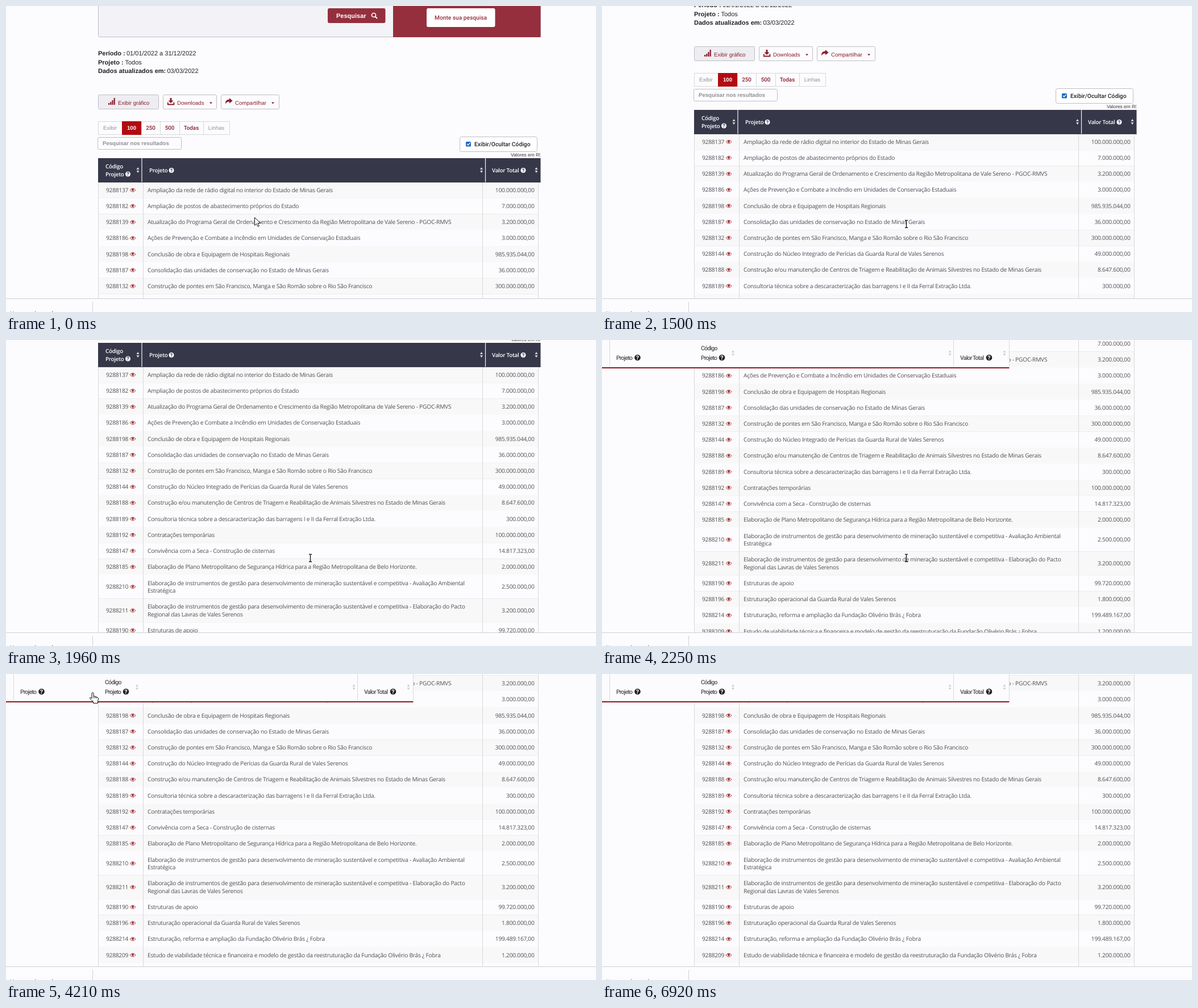
These frames come from a looping animation (1038x539 px, 7080 ms). An HTML page:

```html
<!DOCTYPE html>
<html lang="pt-BR">
<head>
<meta charset="utf-8">
<title>Consulta de projetos</title>
<style>
  html, body { margin: 0; width: 100%; height: 100%; overflow: hidden; background: #fcfcfe; }
  svg { display: block; width: 1038px; height: 539px; }
  text { text-rendering: geometricPrecision; white-space: pre; }
  .row { font: 10.2px "Open Sans", sans-serif; letter-spacing: -.24px; fill: #505056; }
  .head { font: 600 9.8px "Open Sans", sans-serif; letter-spacing: -.25px; fill: #fff; }
  .arial { font: 11px "Liberation Sans", Arial, sans-serif; fill: #222; }
  .small { font: 9.6px "Liberation Sans", Arial, sans-serif; }
  .mid { font: 500 9.8px Roboto, sans-serif; }
  .narrow { font: 500 10.5px Roboto, sans-serif; letter-spacing: -.8px; fill: #505054; }
  .bold { font-weight: 700; }
</style>
</head>
<body>
<svg viewBox="0 0 1038 539">
  <g id="page"></g>
  <g id="sticky"></g>
  <g id="footer"></g>
  <g id="arrow"><path d="M.5.5V14.5L3.8 11.4L6 16.5L8.3 15.5L6.1 10.5H10.5Z" fill="#fff" stroke="#111"/></g>
  <g id="beam"><path d="M-2.5-6.5H-1L0-5.8L1-6.5H2.5M0-6V6M-2.5 6.5H-1L0 5.8L1 6.5H2.5" fill="none" stroke="#111" stroke-width="1.3"/></g>
  <g id="hand"><path d="M-.5 1.5Q1 -.7 2.5 1.5V7L5 7.3V8L7.6 8.2V9L9.8 9.3Q11.2 9.8 11 12L10 16V19.5H2V17L-3.8 11.2Q-4.5 9.3 -2.6 9.4L-.5 11Z" fill="#fff" stroke="#111" stroke-linejoin="round"/><path d="M2.5 7V11M5 8V11M7.6 9V11.5" stroke="#111" stroke-width=".8"/></g>
</svg>
<script>
const LOOP = 7080, FRAME = 1000 / 24;
const PAPER = '#fcfcfe', WINE = '#952f3d', DEEP = '#8b1c2b', NAVY = '#363849', EDGE = '#bdbdc6', RULE = '#d8d8dc';
const get = id => document.getElementById(id);

const text = (x, y, str, cls, extra = '') => `<text x="${x}" y="${y}" class="${cls}" ${extra}>${str}</text>`;
const box = (x, y, w, h, fill, stroke = 'none', r = 0) =>
  `<rect x="${x}" y="${y}" width="${w}" height="${h}" rx="${r}" fill="${fill}" stroke="${stroke}"/>`;
const path = (d, fill, stroke = 'none', w = 1) => `<path d="${d}" fill="${fill}" stroke="${stroke}" stroke-width="${w}"/>`;
const ink = color => `style="fill:${color}"`;

const help = (x, y, r, disc, mark) => `<circle cx="${x}" cy="${y}" r="${r}" fill="${disc}"/>` +
  text(x, y + r * .72, '?', '', `text-anchor="middle" style="font:700 ${r * 2}px Roboto,sans-serif;fill:${mark}"`);
const sorter = (x, y, color) => path(`M${x - 2.5} ${y - 1}l2.5-4l2.5 4zM${x - 2.5} ${y + 1}l2.5 4l2.5-4z`, color);
const caret = (x, y) => path(`M${x - 2.5} ${y - 1}h5l-2.5 3z`, DEEP);
const eye = (x, y) => path(`M${x - 5} ${y}Q${x} ${y - 6} ${x + 5} ${y}Q${x} ${y + 6} ${x - 5} ${y}Z`, PAPER, '#a5393d') +
  `<circle cx="${x}" cy="${y - .4}" r="2.1" fill="#a5393d"/>`;

const rows = `9288137|Ampliação da rede de rádio digital no interior do Estado de Minas Gerais|100.000.000,00
9288182|Ampliação de postos de abastecimento próprios do Estado|7.000.000,00
9288139|Atualização do Programa Geral de Ordenamento e Crescimento da Região Metropolitana de Vale Sereno - PGOC-RMVS|3.200.000,00
9288186|Ações de Prevenção e Combate a Incêndio em Unidades de Conservação Estaduais|3.000.000,00
9288198|Conclusão de obra e Equipagem de Hospitais Regionais|985.935.044,00
9288187|Consolidação das unidades de conservação no Estado de Minas Gerais|36.000.000,00
9288132|Construção de pontes em São Francisco, Manga e São Romão sobre o Rio São Francisco|300.000.000,00
9288144|Construção do Núcleo Integrado de Perícias da Guarda Rural de Vales Serenos|49.000.000,00
9288188|Construção e/ou manutenção de Centros de Triagem e Reabilitação de Animais Silvestres no Estado de Minas Gerais|8.647.600,00
9288189|Consultoria técnica sobre a descaracterização das barragens I e II da Ferral Extração Ltda.|300.000,00
9288192|Contratações temporárias|100.000.000,00
9288147|Convivência com a Seca - Construção de cisternas|14.817.323,00
9288185|Elaboração de Plano Metropolitano de Segurança Hídrica para a Região Metropolitana de Belo Horizonte.|2.000.000,00
9288210|Elaboração de instrumentos de gestão para desenvolvimento de mineração sustentável e competitiva - Avaliação Ambiental~Estratégica|2.500.000,00
9288211|Elaboração de instrumentos de gestão para desenvolvimento de mineração sustentável e competitiva - Elaboração do Pacto~Regional das Lavras de Vales Serenos|3.200.000,00
9288190|Estruturas de apoio|99.720.000,00
9288196|Estruturação operacional da Guarda Rural de Vales Serenos|1.800.000,00
9288214|Estruturação, reforma e ampliação da Fundação Olivério Brás ¿ Fobra|199.489.167,00
9288209|Estudo de viabilidade técnica e financeira e modelo de gestão da reestruturação da Fundação Olivério Brás ¿ Fobra|1.200.000,00
||`.split('\n').map(line => line.split('|'));

function searchPanel() {
  return box(162.5, -10, 778, 64.5, '#f3f3f7', EDGE, 2) + box(681, -10, 259.5, 65, WINE) +
    box(566, 4, 101.5, 26, WINE, 'none', 3) + text(581, 21, 'Pesquisar', 'arial bold', ink('#fff')) +
    '<circle cx="647" cy="16" r="3.5" fill="none" stroke="#fff" stroke-width="1.7"/>' +
    path('M649.5 18.5l3.5 3.5', 'none', '#fff', 2) +
    box(740, 4, 120.5, 33, '#fff', 'none', 3) +
    text(754, 24, 'Monte sua pesquisa', 'mid', `style="font-size:10.2px;fill:${WINE}"`);
}

function summary() {
  return [['Período :', '01/01/2022 a 31/12/2022', 212], ['Projeto :', 'Todos', 209.5], ['Dados atualizados em:', '03/03/2022', 283.5]]
    .map(([label, value, x], i) => text(162, 87 + i * 15.5, label, 'arial bold') + text(x, 87 + i * 15.5, value, 'arial')).join('');
}

function toolbar() {
  const label = (x, str) => text(x, 174, str, 'small', ink(DEEP));
  return box(162.5, 156.5, 106, 25, '#ededf2', EDGE, 2) + box(276.5, 156.5, 94, 25, PAPER, EDGE, 2) +
    box(378.5, 156.5, 102, 25, PAPER, EDGE, 2) +
    [3, 5, 8, 12].map((h, i) => box(180 + i * 3.2, 174 - h, 2.2, h, DEEP)).join('') +
    label(197, 'Exibir gráfico') + label(301, 'Downloads') + label(403, 'Compartilhar') +
    path('M288.5 162h3v4.5h3l-4.5 4.5l-4.5-4.5h3z', DEEP) + path('M284.8 169.5v4h10.6v-4', 'none', DEEP, 1.8) +
    path('M386 173Q385 165 393 164.5V162L398.5 167L393 171.5V168.5Q388 168 386 173Z', DEEP) +
    caret(360.5, 170.5) + caret(469.5, 170.5);
}

function pager() {
  const cells = [['Exibir', 162, 204], ['100', 204, 238], ['250', 238, 271], ['500', 271, 305], ['Todas', 305, 347], ['Linhas', 347, 393]];
  return cells.map(([str, a, b], i) => {
    const on = i === 1, dim = i === 0 || i === 5;
    return box(a + .5, 203.5, b - a, 23, on ? '#b20b12' : PAPER, on ? '#b20b12' : RULE) +
      text((a + b) / 2, 218, str, dim ? 'small' : on ? 'small bold' : 'mid',
        `text-anchor="middle" ${ink(on ? '#fff' : dim ? '#929297' : DEEP)}`);
  }).join('');
}

function filters() {
  return box(161.5, 231.5, 147, 21, PAPER, EDGE, 2) +
    text(170, 245, 'Pesquisar nos resultados', 'small bold', ink('#909095')) +
    box(798.5, 230.5, 136, 26, '#fff', EDGE, 3) + box(809, 239, 9, 8.5, '#1769c5', 'none', 1.5) +
    path('M811 243l2 2l3.5-4', 'none', '#fff', 1.3) +
    text(824, 247, 'Exibir/Ocultar Código', 'mid', 'style="font-size:10.3px;fill:#222"') +
    '<svg x="880" y="255" width="60" height="12">' +
    text(8, 10, 'Valores em R$', 'small', 'style="font-size:8.4px;fill:#333"') + '</svg>';
}

function table() {
  let y = 310, out = '';
  rows.forEach(([code, name, value], i) => {
    const lines = name.split('~'), h = lines.length > 1 ? 41.8 : 28.2, mid = y + h / 2 + 3.7;
    out += box(162, y, 775, h, i % 2 ? PAPER : '#f8f8f9');
    out += path(`M162 ${Math.round(y + h) + .5}H937`, 'none', RULE);
    if (code) out += text(176, mid, code, 'row') + eye(223, mid - 3.5);
    lines.forEach((line, n) => out += text(249, mid + (n - (lines.length - 1) / 2) * 13.4, line, 'row'));
    out += text(929.5, mid, value, 'row', 'text-anchor="end"');
    y += h;
  });
  out += path(`M162.5 310V${y}M241.5 310V${y}M838.5 310V${y}M936.5 310V${y}`, 'none', RULE);
  return out + box(162, 268, 778.5, 42.5, NAVY) + path('M162 310H940.5', 'none', '#20222d') +
    path('M239 268V310M843.5 268V310', 'none', '#f4f4f6', 1.2) +
    text(175, 286, 'Código', 'head') + text(175, 299.5, 'Projeto', 'head') + text(252, 293, 'Projeto', 'head') +
    text(855, 293, 'Valor Total', 'head') +
    [[214.5, 296], [291, 289.5], [910, 289.5]].map(([x, cy]) => help(x, cy, 4.5, '#fff', NAVY)).join('') +
    [232, 836.5, 933].map(x => sorter(x, 289, '#d9d9df')).join('');
}

get('page').innerHTML = searchPanel() + summary() + toolbar() + pager() + filters() + table();
get('sticky').innerHTML = box(0, 0, 716.5, 49, PAPER) + path('M13.5 0V47M618.5 0V47M716.5 0V47', 'none', RULE) +
  box(0, 48, 716.5, 2, '#8e1820') +
  text(25, 35, 'Projeto', 'narrow') + text(174, 18, 'Código', 'narrow') +
  text(174, 35, 'Projeto', 'narrow') + text(630, 35, 'Valor Total', 'narrow') +
  [62.5, 211, 681].map(x => help(x, 31, 5.3, '#222', '#fff')).join('') +
  [230.5, 612, 708].map(x => sorter(x, 23, '#cfcfc8')).join('');
get('footer').innerHTML = box(0, 515, 1038, 24, PAPER) + path('M0 515.5H1038M152.5 521V539', 'none', '#d0d0d6') +
  text(0, 546, '- Notas sobre a área', 'arial');

// time, scroll offset
const scrollTrack = [[0, 0], [1255, 0], [1291, 1], [1666, 152], [1958, 263], [2150, 328], [2300, 355], [2460, 364]];
// time, x, y, shape held until the next step
const pointerTrack = [
  [0, 437, 372, 'arrow'], [130, 437, 372, 'arrow'], [500, 478, 374, 'arrow'], [830, 531, 383, 'beam'],
  [1080, 535.5, 384, 'beam'], [3040, 535.5, 384, 'arrow'], [3125, 494, 249, 'arrow'], [3350, 340, 105, 'arrow'],
  [3520, 300, 36, 'hand'], [3710, 250, 26, 'hand'], [4000, 92, 26, 'hand'], [4420, 212, 38, 'hand'],
  [4700, 305, 40, 'hand'], [4950, 240, 42, 'hand'], [5170, 290, 46, 'hand'], [5400, 205, 46, 'hand'],
  [5625, 294.5, 44, 'hand'], [5880, 294.5, 44, 'arrow'], [6540, 1018, 504, ''], [LOOP, 1018, 504, '']
];

function sample(track, t) {
  let i = track.length - 1;
  while (i && track[i][0] > t) i--;
  const a = track[i], b = track[i + 1] || a;
  const p = b === a ? 0 : (t - a[0]) / (b[0] - a[0]);
  return a.slice(1).map((v, n) => typeof v === 'number' ? v + (b[n + 1] - v) * p : v);
}

const start = performance.now();
function draw() {
  const now = (performance.now() - start) % LOOP;
  const t = Math.floor((now + 5) / FRAME) * FRAME;
  const scroll = Math.round(sample(scrollTrack, t)[0]);
  get('page').setAttribute('transform', `translate(0 ${-scroll})`);
  get('sticky').style.display = scroll > 268 ? '' : 'none';
  const [x, y, shape] = sample(pointerTrack, t);
  for (const id of ['arrow', 'beam', 'hand']) {
    get(id).style.display = id === shape ? '' : 'none';
    get(id).setAttribute('transform', `translate(${x} ${y})`);
  }
  requestAnimationFrame(draw);
}
draw();
</script>
</body>
</html>
```
